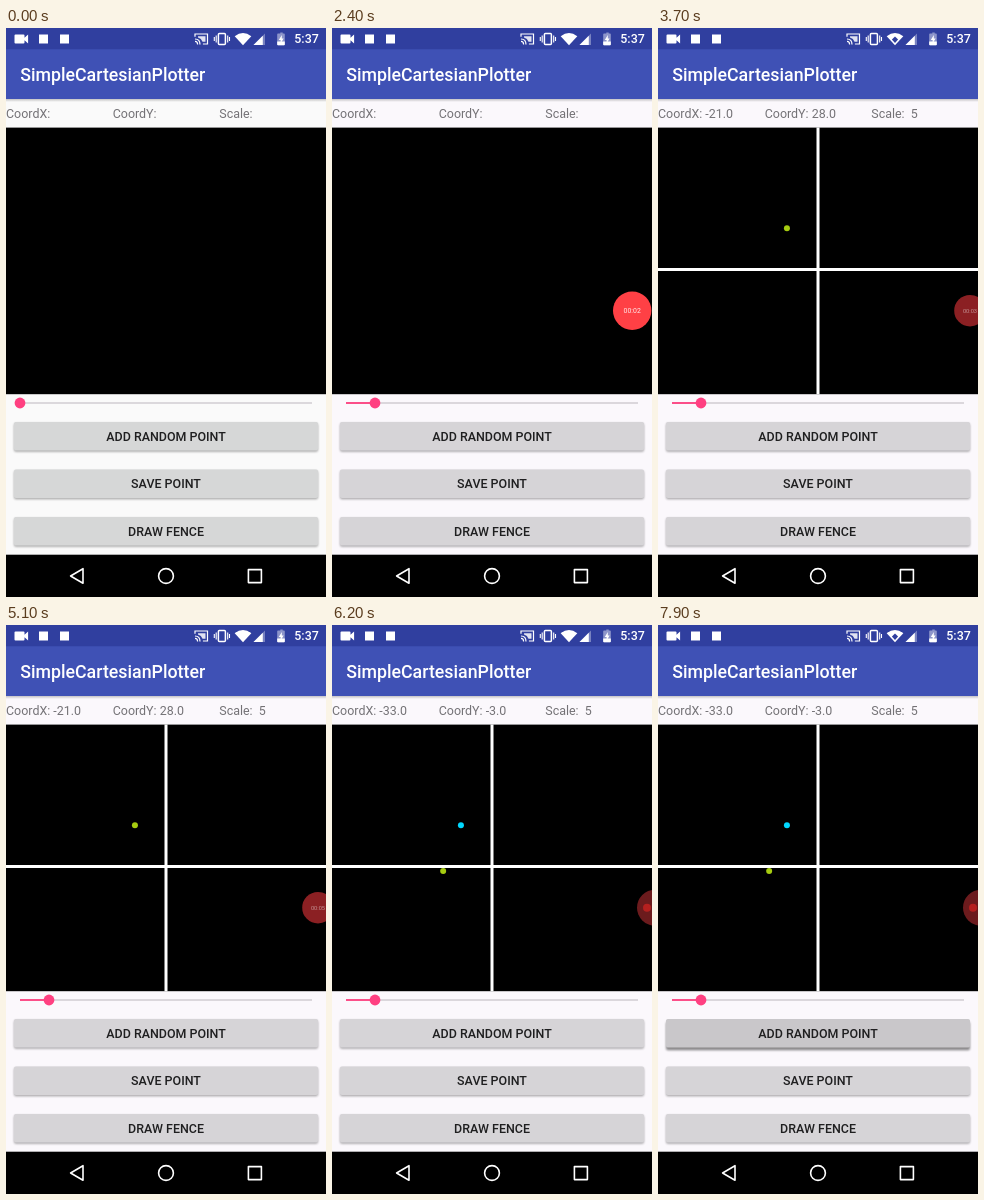
Recreate the animation shown at these times as an HTML page. Size 320 by 569 pixels, loop 8 s.

```html
<!DOCTYPE html>
<html lang="en">
<head>
<meta charset="utf-8">
<title>Cartesian plotter</title>
<style>
  html, body { margin: 0; width: 100%; height: 100%; overflow: hidden; background: #000; }
  svg { display: block; width: 100%; height: 100%; }
  text { font-family: Roboto, "Noto Sans", sans-serif; font-size: 12.44px; white-space: pre; }
  .medium { font-weight: 500; }
  .label { fill: #747276; }
  .caption { font-weight: 500; fill: #1f1f20; text-anchor: middle; }
</style>
</head>
<body>
<svg viewBox="0 0 320 569">
  <defs>
    <filter id="blur" x="-10%" y="-50%" width="120%" height="200%"><feGaussianBlur stdDeviation="1.1"/></filter>
    <linearGradient id="shade" x1="0" y1="0" x2="0" y2="1">
      <stop offset="0" stop-color="#000" stop-opacity=".22"/>
      <stop offset="1" stop-color="#000" stop-opacity="0"/>
    </linearGradient>
  </defs>

  <rect id="page" width="320" height="527" fill="#fafafa"/>
  <rect y="71" width="320" height="3" fill="url(#shade)"/>
  <rect y="21" width="320" height="50" fill="#3f51b5"/>
  <rect width="320" height="21.3" fill="#303f9f"/>
  <text class="medium" x="14.2" y="53.2" fill="#fff" style="font-size:17.78px">SimpleCartesianPlotter</text>

  <!-- status bar -->
  <g fill="#fff">
    <path d="M9.5 6.5h8q1 0 1 1v2.2l3.6-3.2v9l-3.6-3.2v2.2q0 1-1 1h-8q-1 0-1-1v-7q0-1 1-1z"/>
    <rect x="33" y="6.5" width="9" height="9"/>
    <rect x="54" y="6.5" width="9" height="9"/>
    <path d="M189 8.8V6h12.5v10h-4.6M189 11q5 0 5 5.4M189 13.4q2.6 0 2.6 3" fill="none" stroke="#fff" stroke-width="1.2"/>
    <path d="M192 8.3h7.5v5.5h-3q-1-3.3-4.5-4.3z" opacity=".85"/>
    <rect x="212.4" y="5.6" width="7" height="11" rx="1" fill="none" stroke="#fff" stroke-width="1.5"/>
    <path d="M210.2 7.5v7M208.3 9v4M221.7 7.5v7M223.5 9v4" stroke="#fff" stroke-width="1.1"/>
    <path d="M228.7 8.2q8.3-6.2 16.6 0L237 17.2z"/>
    <path id="traffic" d="M237 8.4l3.1 3.2-3.1 3.4-3.1-3.4z" fill="#303f9f"/>
    <path d="M247.5 17L259 5.5V17z" opacity=".35"/>
    <path d="M247.5 17L256.8 7.7V17z"/>
    <path d="M273 5.6h1.3V4.6h2.4v1H278q.8 0 .8.8v10q0 .8-.8.8h-6q-.8 0-.8-.8v-10q0-.8.8-.8z" opacity=".45"/>
    <path d="M271.2 13.5h7.6v2.9q0 .8-.8.8h-6q-.8 0-.8-.8z"/>
    <path d="M275.8 7l-3 5h1.8v3.4l3-5h-1.8z"/>
    <text class="medium" x="288.3" y="15.4">5:37</text>
  </g>

  <text class="label" id="labelX" x="0" y="90.4"></text>
  <text class="label" id="labelY" x="106.7" y="90.4"></text>
  <text class="label" id="labelS" x="213.3" y="90.4"></text>

  <!-- plot -->
  <rect y="99.6" width="320" height="266.6" fill="#000"/>
  <g id="plot">
    <path d="M160 99.6V366.2M0 241.6H320" stroke="#fff" stroke-width="3"/>
    <g id="dots"></g>
  </g>

  <!-- slider -->
  <path d="M14 375H306" stroke="#d0ccd2" stroke-width="1.7"/>
  <path id="fill" stroke="#ff4081" stroke-width="1.8"/>
  <circle id="thumb" cy="375" r="5.4" fill="#ff4081"/>

  <g id="buttons"></g>

  <!-- recorder bubble -->
  <g id="bubble">
    <circle id="disc"/>
    <text id="timer" text-anchor="middle"></text>
    <circle id="pip" cx="315" cy="282.7" r="4" fill="#b5201f"/>
  </g>

  <!-- navigation bar -->
  <rect y="526.7" width="320" height="42.3" fill="#000"/>
  <g fill="none" stroke="#fff" stroke-width="1.6" stroke-linejoin="round">
    <path d="M64.6 548L77 540.7V555.3z"/>
    <circle cx="160" cy="548" r="7.4"/>
    <rect x="242.4" y="541.6" width="13" height="13"/>
  </g>
</svg>
<script>
const LOOP = 8000;
const NS = "http://www.w3.org/2000/svg";
const $ = id => document.getElementById(id);
const clamp = v => Math.min(1, Math.max(0, v));
const ease = v => v * v * (3 - 2 * v);
const ramp = (t, a, b) => ease(clamp((t - a) / (b - a)));
const mix = (a, b, k) => a + (b - a) * k;
const blend = (a, b, k) => `rgb(${a.map((v, i) => Math.round(mix(v, b[i], k)))})`;

function add(parent, tag, attrs) {
  const el = document.createElementNS(NS, tag);
  set(el, attrs);
  return parent.appendChild(el);
}
function set(el, attrs) {
  for (const key in attrs) el.setAttribute(key, attrs[key]);
}
function show(el, on) {
  el.style.display = on ? "" : "none";
}
function write(el, text) {
  if (el.textContent !== text) el.textContent = text;
}

// Each press is [down, up] in ms.
const buttons = [
  { name: "ADD RANDOM POINT", y: 394, presses: [[2600, 2900], [5500, 5800], [7700, 8400]] },
  { name: "SAVE POINT", y: 441.5, presses: [[6900, 7450]] },
  { name: "DRAW FENCE", y: 489, presses: [] }
];
for (const b of buttons) {
  const box = { x: 8, width: 304, height: 28.5, rx: 1.8 };
  b.shadow = add($("buttons"), "rect", { ...box, filter: "url(#blur)" });
  b.face = add($("buttons"), "rect", { ...box, y: b.y });
  add($("buttons"), "text", { class: "caption", x: 160, y: b.y + 18.7 }).textContent = b.name;
}

const UNIT = 1.48;
const points = [
  { x: -21, y: 28, at: 2900 },
  { x: -33, y: -3, at: 5800 }
];
for (const p of points) {
  p.dot = add($("dots"), "circle", { cx: 160 + p.x * UNIT, cy: 241.6 - p.y * UNIT, r: 3 });
}

function drawButtons(t) {
  const rest = t < 100 ? [214, 215, 215] : [214, 212, 215];
  for (const b of buttons) {
    const k = b.presses.reduce((m, [down, up]) =>
      Math.max(m, ramp(t, down, down + 150) * (1 - ramp(t, up, up + 150))), 0);
    b.face.setAttribute("fill", blend(rest, [201, 199, 202], k));
    set(b.shadow, { y: b.y + mix(1.2, 2.8, k), opacity: mix(.33, .45, k) });
  }
}

function drawPlot(t) {
  const shown = points.filter(p => t >= p.at);
  const last = shown[shown.length - 1];
  show($("plot"), last);
  for (const p of points) {
    show(p.dot, t >= p.at);
    p.dot.setAttribute("fill", p === last ? "#a6cc10" : "#00d8ff");
  }
  write($("labelX"), "CoordX:" + (last ? " " + last.x.toFixed(1) : ""));
  write($("labelY"), "CoordY:" + (last ? " " + last.y.toFixed(1) : ""));
  write($("labelS"), "Scale:" + (last ? "  5" : ""));
}

function drawBubble(t) {
  const enter = ramp(t, 50, 350);
  const dim = ramp(t, 2900, 3200);
  const hide = ramp(t, 5300, 5700);
  const x = mix(mix(300.2, 312, dim), 323, hide);
  const r = mix(mix(19.2, 15.8, dim), 18, hide);
  show($("bubble"), t >= 100);
  $("bubble").setAttribute("opacity", enter);
  set($("disc"), {
    cx: x, cy: 282.7, r,
    fill: hide ? blend([139, 32, 35], [108, 27, 29], hide) : blend([255, 64, 69], [139, 32, 35], dim)
  });
  const timer = $("timer");
  write(timer, "00:0" + Math.max(0, Math.floor((t - 100) / 1000)));
  set(timer, { x, y: 285.1, fill: blend([255, 235, 235], [196, 145, 147], dim), opacity: 1 - hide });
  timer.style.fontSize = mix(6.9, 5.7, dim) + "px";
  $("pip").setAttribute("opacity", hide);
}

function draw(t) {
  $("page").setAttribute("fill", t < 100 ? "#fafafa" : "#fbf8fc");
  const busy = t >= 3200 && t < 4200 || t >= 7500;
  show($("traffic"), busy);
  const x = mix(14, 43, ramp(t, 250, 750));
  $("thumb").setAttribute("cx", x);
  $("fill").setAttribute("d", `M14 375H${x}`);
  drawPlot(t);
  drawButtons(t);
  drawBubble(t);
}

const start = performance.now();
function tick() {
  draw((performance.now() - start) % LOOP);
  requestAnimationFrame(tick);
}
tick();
</script>
</body>
</html>
```
